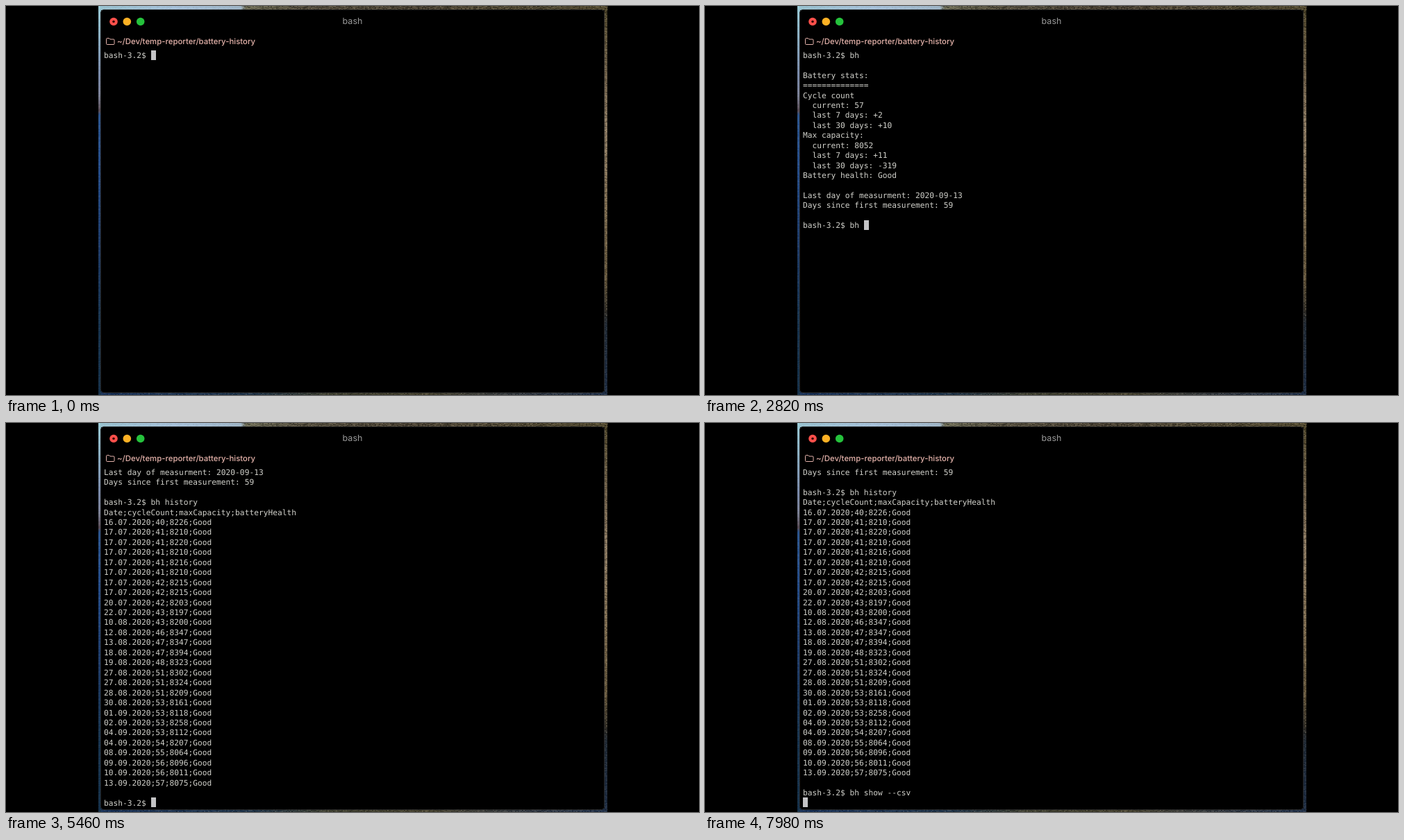
An HTML page with a canvas for the animation above (8 s loop, 998 px wide and 561 px high).

```html
<!DOCTYPE html>
<html lang="en">
<head>
<meta charset="utf-8">
<title>Terminal</title>
<style>
  html, body { margin: 0; width: 100%; height: 100%; overflow: hidden; background: #000; }
  #stage { position: relative; width: 998px; height: 561px; overflow: hidden; text-rendering: geometricPrecision; }
  #stage > * { position: absolute; }
  #wallpaper { left: 0; top: 0; }
  #window { left: 136px; top: 5px; width: 724px; height: 551px; background: #000; border: 1px solid #222; border-radius: 5px; }
  #title { left: 399px; width: 200px; top: 13px; text-align: center; font: 12.5px/20px Inter, sans-serif; color: #989898; }
  #path { left: 160px; top: 41px; font: 500 11.4px/20px Inter, sans-serif; color: #e5b3ab; white-space: nowrap; }
  #screen { left: 141px; top: 64.7px; margin: 0; font: 11.22px/14.455px "DejaVu Sans Mono", monospace; color: #d0d0ca; }
  #cursor { display: inline-block; width: 7px; height: 14px; margin-top: -1.2px; vertical-align: top; background: #c4c4c6; }
</style>
</head>
<body>
<div id="stage">
  <canvas id="wallpaper" width="998" height="561"></canvas>
  <div id="window"></div>
  <svg width="998" height="62" style="left:0;top:0">
    <circle cx="155" cy="22.5" r="5.8" fill="#ff504b"/>
    <circle cx="155" cy="22.5" r="1.8" fill="#3a0505"/>
    <circle cx="174.3" cy="22.5" r="5.8" fill="#fdb124"/>
    <circle cx="193.7" cy="22.5" r="5.8" fill="#25c23c"/>
    <path d="M144.5 54.5V47.5Q144.5 46.5 145.5 46.5H148.5L150 48H155Q156 48 156 49V54.5Q156 55.5 155 55.5H145.5Q144.5 55.5 144.5 54.5Z" fill="none" stroke="#e5b3ab"/>
  </svg>
  <div id="title">bash</div>
  <div id="path">~/Dev/temp-reporter/battery-history</div>
  <pre id="screen"><span id="text"></span><span id="cursor"></span></pre>
</div>
<script>
const LOOP = 8000, ROWS = 34, PROMPT = 'bash-3.2$ ';

const stats = `
Battery stats:
==============
Cycle count
  current: 57
  last 7 days: +2
  last 30 days: +10
Max capacity:
  current: 8052
  last 7 days: +11
  last 30 days: -319
Battery health: Good

Last day of measurment: 2020-09-13
Days since first measurement: 59

`;

// day.month, cycle count, capacity
const records = `16.07 40 8226,17.07 41 8210,17.07 41 8220,17.07 41 8210,17.07 41 8216,17.07 41 8210,
17.07 42 8215,17.07 42 8215,20.07 42 8203,22.07 43 8197,10.08 43 8200,12.08 46 8347,13.08 47 8347,
18.08 47 8394,19.08 48 8323,27.08 51 8302,27.08 51 8324,28.08 51 8209,30.08 53 8161,01.09 53 8118,
02.09 53 8258,04.09 53 8112,04.09 54 8207,08.09 55 8064,09.09 56 8096,10.09 56 8011,13.09 57 8075`;

const history = 'Date;cycleCount;maxCapacity;batteryHealth\n' + records.split(',').map(record => {
  const [day, cycles, capacity] = record.trim().split(' ');
  return `${day}.2020;${cycles};${capacity};Good\n`;
}).join('') + '\n';

// Terminal output as timed chunks of text
const print = (time, text) => [{ time, text }];
const type = (start, step, text) => [...text].map((char, i) => ({ time: start + i * step, text: char }));
const events = [
  ...print(0, PROMPT),
  ...type(300, 150, 'bh'),
  ...print(780, '\n'),
  ...print(960, stats),
  ...print(1080, PROMPT),
  ...type(2460, 150, 'bh '),
  ...type(2940, 105, 'history'),
  ...print(3960, '\n'),
  ...print(4200, history),
  ...print(4440, PROMPT),
  ...type(5730, 130, 'bh show --'),
  ...type(7140, 120, 'csv'),
  ...print(7860, '\n'),
];

function drawWallpaper() {
  const ctx = document.getElementById('wallpaper').getContext('2d');
  let seed = 7;
  const random = () => (seed = seed * 16807 % 2147483647) / 2147483647;

  // colors: alternating position and colour; rough(p) is the grain strength along the strip
  function strip(x, y, w, h, colors, rough) {
    const vertical = h > w;
    const gradient = ctx.createLinearGradient(x, y, vertical ? x : x + w, vertical ? y + h : y);
    for (let i = 0; i < colors.length; i += 2) gradient.addColorStop(colors[i], colors[i + 1]);
    ctx.fillStyle = gradient;
    ctx.fillRect(x, y, w, h);
    for (let py = y; py < y + h; py++) {
      for (let px = x; px < x + w; px += 2) {
        const position = vertical ? (py - y) / h : (px - x) / w;
        const grain = (random() - 0.5) * rough(position);
        ctx.fillStyle = grain > 0 ? `rgba(205,190,160,${grain})` : `rgba(0,0,0,${-grain * 1.5})`;
        ctx.fillRect(px, py, 2, 1);
      }
    }
  }

  strip(133, 0, 733, 6, [0, '#98c2d0', 0.15, '#a8c3dc', 0.28, '#9fb6c8', 0.29, '#6a6a54',
    0.4, '#504a3a', 0.6, '#463e30', 1, '#50482e'], p => p < 0.28 ? 0.06 : 0.45);
  strip(133, 556, 733, 5, [0, '#16305a', 0.3, '#1b3148', 0.45, '#383a2c', 0.65, '#44402e',
    0.85, '#2c3440', 1, '#1a2c48'], p => 0.35);
  strip(133, 0, 4, 561, [0, '#9accd8', 0.06, '#8fb6c8', 0.18, '#7888a8', 0.23, '#7c8298',
    0.27, '#574a54', 0.28, '#2a5590', 0.42, '#234c8a', 0.62, '#1c3a68', 0.8, '#173450', 1, '#14304a'],
    p => p < 0.22 ? 0.06 : 0.15);
  strip(862, 0, 4, 561, [0, '#463e24', 0.1, '#5c5038', 0.2, '#6e5e48', 0.32, '#8c7a62',
    0.5, '#7c6a4e', 0.7, '#5e5036', 0.78, '#322e26', 0.82, '#1e2834', 1, '#1c2c44'],
    p => p < 0.8 ? 0.45 : 0.25);
}

const textNode = document.getElementById('text');
const start = performance.now();
let shown;

function render() {
  const time = (performance.now() - start) % LOOP;
  const output = events.filter(event => event.time <= time).map(event => event.text).join('');
  const visible = output.split('\n').slice(-ROWS).join('\n');
  if (visible !== shown) textNode.textContent = shown = visible;
  requestAnimationFrame(render);
}

drawWallpaper();
render();
</script>
</body>
</html>
```
